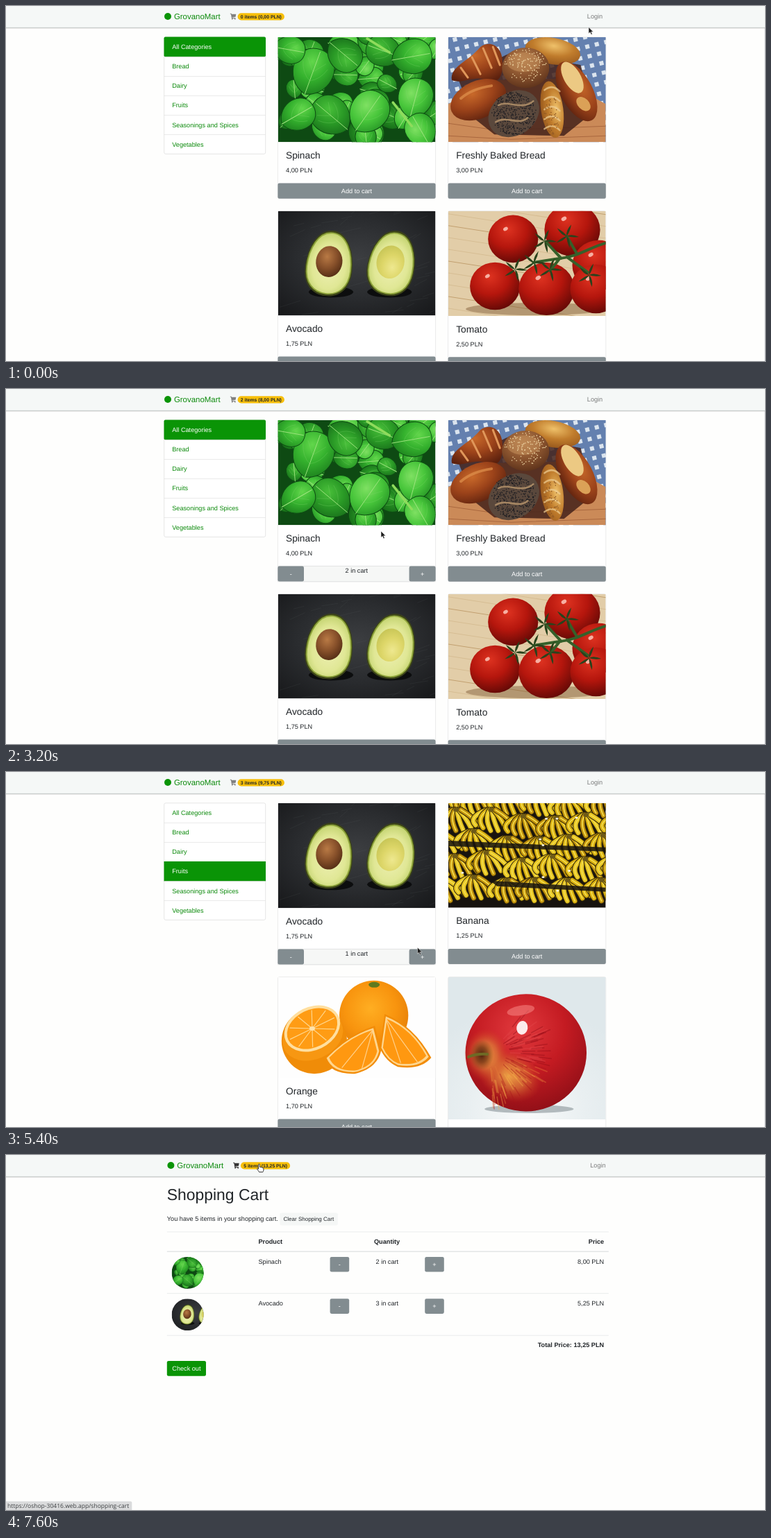
Animation, 1093 px wide and 512 px high, one loop 8 s. Source, as an HTML page:

```html
<!DOCTYPE html>
<html lang="en">
<head>
<meta charset="utf-8">
<title>Shop</title>
<style>
html, body { margin: 0; width: 100%; height: 100%; overflow: hidden; background: #fefefd; }
svg { display: block; }
text { font-family: "Liberation Sans", Arial, sans-serif; white-space: pre; text-rendering: geometricPrecision; }
#url { font-family: "Open Sans", sans-serif; }
</style>
</head>
<body>
<svg id="stage" width="1093" height="512" viewBox="0 0 1093 512"></svg>
<script>
const LOOP = 8000, STEP = 100;
const GREEN = '#0a9406', LINK = '#0c8a0c', INK = '#212529', GREY = '#828c90', DARK = '#6b777c', LINE = '#dcdcdc';
const EM = 9.16;

let seed = 7;
const rnd = (a = 0, b = 1) => {
  seed = (seed * 1103515245 + 12345) % 2147483648;
  return a + (b - a) * seed / 2147483648;
};
const pick = list => list[Math.floor(rnd() * list.length)];
const many = (n, f) => Array.from({ length: n }, (_, i) => f(i)).join('');

const text = (x, y, str, size = EM, fill = INK, more = '') =>
  `<text x="${x}" y="${y}" font-size="${size}" fill="${fill}" ${more}>${str}</text>`;
const rect = (x, y, w, h, fill, more = '') =>
  `<rect x="${x}" y="${y}" width="${w}" height="${h}" fill="${fill}" ${more}/>`;
const oval = (x, y, rx, ry, fill, turn = 0, more = '') =>
  `<ellipse rx="${rx}" ry="${ry}" fill="${fill}" transform="translate(${x} ${y}) rotate(${turn})" ${more}/>`;
const path = (d, fill, more = '') => `<path d="${d}" fill="${fill}" ${more}/>`;
const stroke = (d, color, w, more = '') =>
  path(d, 'none', `stroke="${color}" stroke-width="${w}" stroke-linecap="round" ${more}`);
const group = (x, y, inner, more = '') => `<g transform="translate(${x} ${y}) ${more}">${inner}</g>`;
const photo = (id, h, inner) => `<symbol id="${id}" viewBox="0 0 226 ${h}" preserveAspectRatio="none">${inner}</symbol>`;
const radial = (id, cx, cy, ...stops) =>
  `<radialGradient id="${id}" cx="${cx}" cy="${cy}" r=".75">` +
  stops.map((c, i) => `<stop offset="${i / (stops.length - 1)}" stop-color="${c}"/>`).join('') + '</radialGradient>';

// ---- pictures ----
function leaf(x, y, r, turn, fill) {
  const k = r * 1.15;
  return group(x, y,
    path(`M0 ${-r} C${k} ${-r} ${k} ${r * .7} 0 ${r} C${-k} ${r * .7} ${-k} ${-r} 0 ${-r}Z`, fill, 'stroke="#0d4d12" stroke-width="1"') +
    stroke(`M0 ${-r * .9} L0 ${r}`, '#9fe47f', .9) +
    stroke(`M0 ${r * .4} Q${r * .4} ${r * .2} ${r * .55} ${-r * .3} M0 ${r * .4} Q${-r * .4} ${r * .2} ${-r * .55} ${-r * .3} M0 0 L${r * .4} ${-r * .5} M0 0 L${-r * .4} ${-r * .5}`, '#7fd36c', .4, 'opacity=".7"'),
    `rotate(${turn})`);
}

function spinach() {
  const tones = ['url(#leafA)', 'url(#leafB)', 'url(#leafC)', 'url(#leafD)'];
  const big = [[50, 50, 34, 20], [76, 113, 31, -50], [130, 108, 32, 35], [28, 112, 26, 60], [152, 20, 26, -70],
    [197, 88, 29, 15], [192, 28, 29, 80], [95, 25, 27, 130], [205, 134, 25, -30], [16, 18, 23, 100]];
  return photo('spinach', 151, rect(0, 0, 226, 151, '#0e4a13') +
    many(48, () => leaf(rnd(-5, 231), rnd(-5, 156), rnd(13, 23), rnd(0, 360), pick(tones))) +
    big.map(([x, y, r, a], i) => leaf(x, y, r, a, tones[i % 3])).join('') +
    stroke('M165 94 L192 128 M128 2 L160 22', '#8fdc5c', 3.5));
}

function bread() {
  const seeds = (n, x, y, rx, ry, c) => many(n, () => {
    const a = rnd(0, 6.28), r = Math.sqrt(rnd());
    return `<circle cx="${x + rx * r * Math.cos(a)}" cy="${y + ry * r * Math.sin(a)}" r=".8" fill="${c}"/>`;
  });
  return photo('bread', 151,
    rect(0, 0, 226, 151, '#dbe4ee') +
    `<g transform="rotate(-14 113 30)" fill="#143f86" opacity=".6">` +
    many(20, i => `<path d="M${i * 14 - 20} -60h8v260h-8z M-30 ${i * 14 - 60}h290v8h-290z"/>`) + '</g>' +
    path('M0 96 L60 62 L160 60 L226 96 V151 H0Z', '#cb8a58') +
    stroke('M0 124 L70 134 L226 128 M0 142 L90 147 L226 142', '#a9673e', 1) +
    path('M14 60 L90 22 L190 40 L208 108 L166 142 L66 140 L36 116Z', '#45231a', 'opacity=".85"') +
    oval(150, 20, 40, 19, 'url(#roll)', 10) +
    path('M5 62 C2 42 28 36 46 14 C60 4 78 12 78 38 C78 62 68 68 54 62 C38 54 22 68 5 62Z', 'url(#crust)') +
    stroke('M18 44 L28 58 M34 29 L46 53 M50 16 L62 44 M64 14 L74 40', '#e0975a', 3) +
    oval(111, 44, 34, 29, 'url(#bun)') + oval(108, 36, 24, 14, '#c08b58', 0, 'opacity=".6"') + seeds(120, 111, 40, 30, 24, '#edd3a2') +
    oval(43, 90, 42, 27, 'url(#crust)', -24) + stroke('M18 88 C32 76 48 72 62 70', '#e0924e', 4, 'opacity=".7"') +
    oval(184, 78, 47, 23, 'url(#crust)', 62) + oval(178, 58, 25, 12, '#ecc983', 60) + oval(194, 96, 12, 8, '#dba157', 45) +
    oval(94, 110, 39, 31, '#5a483c', -35) + seeds(430, 94, 110, 32, 31, '#1f1e22') +
    stroke('M72 98 C85 90 105 106 122 92 M68 122 C84 112 100 128 114 116', '#a58663', 2.6) +
    oval(149, 104, 41, 16, 'url(#roll)', 82) +
    many(5, i => stroke(`M138 ${76 + i * 14} q12 -9 22 2`, '#efcf94', 2.5, 'opacity=".7"')) + seeds(50, 149, 112, 11, 28, '#8a5423'));
}

function avocado() {
  const egg = 'M0 -48 C22 -48 34 -20 34 8 C34 34 19 47 0 47 C-19 47 -34 34 -34 8 C-34 -20 -22 -48 0 -48Z';
  const half = (x, turn, core) => group(x, 76,
    path(egg, '#3d4518') + group(0, 0, path(egg, 'url(#flesh)', 'stroke="#8ea43a" stroke-width="2"'), 'scale(.93)') + core, `rotate(${turn})`);
  return photo('avocado', 151, rect(0, 0, 226, 151, 'url(#slate)') +
    many(45, () => stroke(`M${rnd(0, 226)} ${rnd(0, 151)} l${rnd(10, 30)} ${rnd(-10, -3)}`, '#6b6d70', .5, 'opacity=".25"')) +
    oval(76, 117, 32, 8, '#0c0d0e') + oval(160, 117, 32, 8, '#0c0d0e') +
    half(73.5, 7, oval(-.5, -3, 19, 22.5, 'url(#pit)')) +
    half(163, 11, oval(-2, -2, 20, 24, 'url(#hollow)')));
}

function tomato() {
  const balls = [[178, 27, 40], [93, 40, 36], [216, 78, 38], [67, 108, 36], [141, 112, 40], [212, 112, 37]];
  const star = (x, y) => group(x, y, many(5, i => `<path d="M0 0 Q5 -6 17 -5 Q8 0 0 0" fill="#29421c" transform="rotate(${i * 72 + 20})"/>`));
  return photo('tomato', 151, rect(0, 0, 226, 151, '#e2cda8') +
    many(14, i => stroke(`M0 ${i * 17 - 30} L226 ${i * 17 + 5}`, i % 3 ? '#d6bd93' : '#c2a070', 1)) +
    oval(125, 141, 100, 9, '#7a5530', 0, 'opacity=".45"') +
    balls.map(([x, y, r]) => oval(x, y, r, r * .95, 'url(#red)') + oval(x - r * .3, y - r * .4, r * .1, r * .07, '#ffd0c4', -30, 'opacity=".8"')).join('') +
    stroke('M226 46 C204 52 185 66 160 68 L122 74 M162 68 L140 44 M160 68 L146 86 M185 62 L170 36 M170 66 L200 88', '#35602a', 4) +
    star(123, 74) + star(146, 84) + star(138, 43) + star(170, 36) + star(202, 92) + star(96, 84));
}

function banana() {
  const bunch = (x, y) => group(x, y, many(6, i => {
    const dx = (i - 2.5) * 9, d = `M${dx * .3} 0 Q${dx * 1.3 - 4} 11 ${dx * 1.2 + 5} ${32 - Math.abs(i - 2.5) * 4}`;
    return stroke(d, '#3a2c08', 8.6) + stroke(d, pick(['#d9b010', '#c2930d', '#e6c522']), 6.4) + stroke(d, '#f4dc4c', 1.8);
  }) + oval(0, 0, 4, 3, '#6e5a18'));
  return photo('banana', 151, rect(0, 0, 226, 151, '#17130f') +
    many(5, r => many(6, i => bunch(i * 46 - 10 + (r % 2) * 22 + rnd(-5, 5), r * 31 - 18 + rnd(-5, 5) + i * 1.5))) +
    path('M0 54 L226 64 V70 L0 62Z M60 112 L226 122 V128 L70 120Z', '#17130f', 'opacity=".85"') +
    many(9, () => oval(rnd(0, 226), rnd(0, 140), 2, 1.4, '#f4f2e8')));
}

function orange() {
  const spokes = (n, rx, ry) => many(n, i => {
    const a = i * 6.283 / n;
    return stroke(`M0 0 L${rx * Math.cos(a)} ${ry * Math.sin(a)}`, '#ffd58a', 1.2);
  });
  const slice = (d, x, y, veins) => {
    const inner = (k, fill) => group(x, y, group(-x, -y, path(d, fill)), `scale(${k})`);
    return path(d, '#f28c08') + inner(.92, '#ffd68e') + inner(.84, '#ff9810') + stroke(veins, '#ffd08a', 1.2);
  };
  return photo('orange', 145, rect(0, 0, 226, 145, '#fefefe') +
    oval(137.5, 55, 49.5, 50, 'url(#peel)') + oval(138, 11, 8, 4, '#5f7a1e') +
    group(50, 89, oval(2, 3, 47, 47, '#f08c08') + oval(0, -4, 45, 33, '#f79712', -24) +
      oval(-1, -15, 42, 31, '#ffdf9f', -26) + oval(-1, -15, 38, 27, '#ff9c14', -26) +
      group(-1, -15, spokes(10, 35, 25), 'rotate(-26)') + oval(-1, -15, 4, 3, '#ffe3ac')) +
    slice('M66 117 Q75 140 110 139 Q142 132 148 106 L139 70 Q100 82 66 117Z', 112, 110, 'M136 76 L92 130 M136 76 L120 133') +
    slice('M146 102 L153 53 Q195 70 220 116 Q205 134 172 129 Q155 122 146 102Z', 175, 98, 'M155 60 L176 123 M155 60 L200 122'));
}

function apple() {
  return photo('apple', 205, rect(0, 0, 226, 205, 'url(#studio)') +
    oval(116, 190, 64, 6, '#98a2a6', 0, 'opacity=".7"') +
    oval(111.5, 109, 87, 84.5, 'url(#skin)') + oval(88, 142, 48, 36, 'url(#blush)', 25) +
    many(110, () => {
      const a = rnd(-.9, 1.5), r = rnd(25, 78), c = Math.cos(a), s = Math.sin(a);
      return stroke(`M${58 + r * c} ${108 + r * .85 * s} l${18 * c} ${18 * s}`, pick(a > .3 ? ['#f3ac48', '#e8803a', '#a8141a'] : ['#8f0c14', '#e0484a']), 1.6, 'opacity=".4"');
    }) +
    oval(54, 112, 32, 38, 'url(#blush)') + oval(48, 112, 17, 22, 'url(#cavity)') +
    stroke('M56 111 Q40 110 29 115', '#6e6a25', 4) +
    oval(106, 73, 8, 10, '#fff', 10, 'opacity=".9"') + oval(104, 48, 20, 7, '#ff9a94', -10, 'opacity=".45"'));
}

const gradients = [
  radial('leafA', .4, .3, '#62d74b', '#35b22e', '#1c7f1d'), radial('leafB', .6, .35, '#49c03a', '#2a9a26', '#166a19'),
  radial('leafC', .35, .4, '#7fe162', '#48c63b', '#218f22'), radial('leafD', .5, .5, '#2f9f2a', '#1c7a1c', '#0e5213'),
  radial('roll', .5, .3, '#efc16a', '#c07c2c', '#94551b'), radial('crust', .45, .3, '#c8692a', '#9c431a', '#5c210e'),
  radial('bun', .45, .3, '#b98250', '#8d5630', '#5a3019'),
  radial('flesh', .5, .55, '#eef0b4', '#e0e795', '#a3bd48'), radial('pit', .4, .35, '#b97a45', '#87502a', '#4b2711'),
  radial('hollow', .6, .65, '#eee88f', '#ddd668', '#c3c253'), radial('red', .4, .3, '#dd3220', '#b5160d', '#5e0805'),
  radial('peel', .45, .4, '#ffae22', '#f8940e', '#dd7604'), radial('skin', .45, .3, '#e23a3e', '#c41b22', '#8c0e16'),
  radial('blush', .5, .5, '#eda345', '#e08a3c99', '#d0402000', '#d0402000'), radial('cavity', .5, .5, '#4d220e', '#6e3214bb', '#80401800', '#80401800'),
  radial('slate', .5, .45, '#3c3e41', '#2a2c2f', '#161719'), radial('studio', .5, .95, '#f8fafa', '#e9eff1', '#dfe8eb')
].join('');

// ---- page pieces ----
const button = (x, y, w, h, label, fill = GREY, id = '') =>
  rect(x, y, w, h, fill, `rx="2.3" ${id && `id="${id}"`}`) + text(x + w / 2, y + h / 2 + 3.2, label, EM, '#fff', 'text-anchor="middle"');

function card(x, y, h, img, title, price, id) {
  const b = y + h;
  return rect(x, y, 227.2, h + 81.5, '#fff', `rx="2.3" stroke="${LINE}" stroke-width=".6"`) +
    `<use href="#${img}" x="${x + .4}" y="${y + .2}" width="226.6" height="${h - .2}"/>` +
    text(x + 11.6, b + 23.7, title, 13.75) + text(x + 11.6, b + 43.5, price) +
    button(x, b + 59.2, 227.2, 22.2, 'Add to cart', GREY, id);
}

const categories = ['All Categories', 'Bread', 'Dairy', 'Fruits', 'Seasonings and Spices', 'Vegetables'];
const ROW = 28.1, TOP = 44.8;
const sidebar = rect(227.7, TOP, 146, ROW * 6, '#fff', `rx="2.3" stroke="${LINE}" stroke-width=".7"`) +
  categories.map((c, i) =>
    (i ? rect(227.7, TOP + ROW * i, 146, .6, LINE) : '') +
    rect(227.5, TOP + ROW * i - .2, 146.5, ROW + .5, GREEN, `id="row${i}" rx="${i ? 0 : 2}"`) +
    text(239.2, TOP + ROW * i + 17.3, c, EM, LINK, `id="cat${i}"`)).join('');

const cartLine = (y, img, name, count, price) =>
  `<clipPath id="c-${img}"><circle cx="261.5" cy="${y + 30.2}" r="23"/></clipPath>` +
  `<g clip-path="url(#c-${img})"><use href="#${img}" x="238.5" y="${y + 7.2}" width="69" height="46"/></g>` +
  text(363.5, y + 17, name) + button(466.6, y + 7.2, 27.6, 21.7, '-') + text(532.5, y + 17, count + ' in cart') +
  button(603.2, y + 7.2, 27.6, 21.7, '+') + text(861.2, y + 17, price, EM, INK, 'text-anchor="end"');

const bold = 'font-weight="700"', end = 'text-anchor="end"';
const cartPage = text(231.8, 65.4, 'Shopping Cart', 22.92) +
  text(231.8, 95.3, 'You have 5 items in your shopping cart.') +
  rect(394.4, 83.4, 83.4, 18, '#f5f7f6', 'rx="1.8"') + text(399.5, 95.2, 'Clear Shopping Cart', 8.02) +
  [110.6, 199.4, 259.8].map(y => rect(231.8, y, 636, .7, '#e2e4e5')).join('') + rect(231.8, 138.6, 636, 1.2, '#dcdfe1') +
  text(363.5, 128, 'Product', EM, INK, bold) + text(530, 128, 'Quantity', EM, INK, bold) + text(861.2, 128, 'Price', EM, INK, `${bold} ${end}`) +
  cartLine(139.7, 'spinach', 'Spinach', 2, '8,00 PLN') + cartLine(200, 'avocado', 'Avocado', 3, '5,25 PLN') +
  text(861.2, 276.9, 'Total Price: 13,25 PLN', EM, INK, `${bold} ${end}`) +
  button(231.8, 296.9, 56.2, 21.8, 'Check out', GREEN);

const nav = rect(-10, 0, 1113, 31, '#f5f8f7') + rect(-10, 30.8, 1113, 1.5, '#c9cbcb') +
  `<circle cx="233" cy="15" r="5" fill="${GREEN}"/>` + text(241.9, 18.9, 'GrovanoMart', 11.46, LINK) +
  path('M322.8 10.8h1.8l.4 1h6.3l-.7 4-4.9.6.2.7h4.5v.8h-5.4l-1.1-6.2h-1.1z M325 18.1h1.5v1.3h-1.5z M329 18.1h1.5v1.3h-1.5z', '#808080', 'id="trolley"') +
  rect(333.6, 10.3, 68, 10.2, '#f7bf0a', 'rx="5.1" id="pill"') + text(337.8, 17.9, '', 6.87, INK, bold + ' id="badge"') +
  text(836.8, 17.9, 'Login', EM, '#7b7c7c', 'id="login"');

const stepper = rect(391.4, 255.2, 227.2, 22.7, '#f6f7f6', `stroke="${LINE}" stroke-width=".6"`) +
  text(504.8, 265.4, '', EM, INK, 'id="count" text-anchor="middle"') +
  button(391.4, 255.6, 37.6, 22, '-') + button(580.6, 255.6, 38, 22, '+', GREY, 'plus');

const arrow = path('M0 0 V9.2 L2.1 7.3 L3.7 10.8 L5.3 10.1 L3.7 6.8 H6.7Z', '#1c1c1c', 'id="arrow" stroke="#fff" stroke-width=".5"');
const hand = path('M-1 1 Q-1 0 0 0 Q1 0 1 1 V4.4 Q2.9 3.9 3.1 5 Q4.8 4.5 5 5.6 Q6.4 5.4 6.4 6.8 V9 Q6.1 10.4 5.4 11.6 H0 Q-1 9.4 -3 7.4 Q-3.2 5.9 -1 7.2Z', '#fff', 'id="hand" stroke="#222" stroke-width=".9"');

const $ = id => document.getElementById(id);
$('stage').innerHTML = `<defs>${gradients}${spinach()}${bread()}${avocado()}${tomato()}${banana()}${orange()}${apple()}</defs>` +
  rect(0, 0, 1093, 512, '#fefefd') +
  `<g id="shop">${sidebar}
    <g id="all">${card(391.4, 44.8, 151.5, 'spinach', 'Spinach', '4,00 PLN', 'add0')}
      ${card(636.6, 44.8, 151.5, 'bread', 'Freshly Baked Bread', '3,00 PLN', 'add1')}
      ${card(391.4, 295.6, 150.8, 'avocado', 'Avocado', '1,75 PLN')}
      ${card(636.6, 295.6, 151.5, 'tomato', 'Tomato', '2,50 PLN')}</g>
    <g id="fruits">${card(391.4, 44.8, 151.5, 'avocado', 'Avocado', '1,75 PLN', 'add2')}
      ${card(636.6, 44.8, 150.9, 'banana', 'Banana', '1,25 PLN')}
      ${card(391.4, 295.6, 145.6, 'orange', 'Orange', '1,70 PLN')}
      ${card(636.6, 295.6, 205.4, 'apple', 'Apple', '1,50 PLN')}</g>
    <g id="stepper">${stepper}</g>${rect(1092, 0, 1, 512, '#e6e7ea')}</g>
  <g id="cart">${cartPage}</g><g id="nav">${nav}</g>
  <g id="status">${rect(-3, 499.6, 190, 16, '#dadbdc', 'rx="2" id="box"')}${text(2, 509.3, '', 8.52, '#3c3f41', 'id="url"')}</g>
  <g id="mouse">${arrow}${hand}</g>`;

// ---- timeline ----
const track = [
  [0, 839, 30.5], [100, 837, 31], [400, 837, 31], [500, 855, 15], [600, 846, 24], [700, 815, 70], [900, 710, 165],
  [1100, 615, 225], [1300, 565, 250], [1500, 556, 263], [1600, 556, 263], [1900, 604, 264], [2300, 604, 264],
  [2500, 615, 274], [2700, 655, 262], [3000, 628, 256], [3100, 628, 256], [3200, 540, 205], [3400, 262, 114],
  [3700, 262, 114], [3800, 266, 136], [4000, 265.5, 134.5], [4300, 265.5, 134.5], [4500, 340, 198], [4700, 472, 213.5],
  [4800, 472, 213.5], [5100, 512, 264], [5200, 514, 264], [5400, 592.5, 253], [5700, 600, 265], [6300, 600, 265],
  [6500, 540, 215], [6700, 368, 85], [6800, 362, 40], [6900, 368, 11], [7400, 367.5, 10.5], [7500, 376, 12], [7600, 364.5, 13], [8000, 364.5, 13]
];
const orders = [
  [0, 0, '0 items (0,00 PLN)'], [1600, 1, '1 item (4,00 PLN)'], [2300, 2, '2 items (8,00 PLN)'], [4300, 0, '2 items (8,00 PLN)'],
  [5200, 1, '3 items (9,75 PLN)'], [6000, 2, '4 items (11,50 PLN)'], [6200, 3, '5 items (13,25 PLN)']
];
const links = [[0, ''], [3600, '?category=dairy'], [3800, '?category=fruits'], [4500, '?category=vegetables'], [4900, ''], [7100, 'shopping-cart']];
const latest = (list, t) => list.filter(e => e[0] <= t).pop();

function pointer(t) {
  const i = Math.max(1, track.findIndex(k => k[0] >= t));
  const [t0, x0, y0] = track[i - 1], [t1, x1, y1] = track[i];
  const k = (t - t0) / (t1 - t0);
  return [x0 + (x1 - x0) * k, y0 + (y1 - y0) * k];
}

const set = (id, name, value) => $(id).setAttribute(name, value);
const show = (id, on) => set(id, 'visibility', on ? 'inherit' : 'hidden');

function draw(t) {
  const page = t < 4300 ? 'all' : t < 7200 ? 'fruits' : 'cart';
  const shop = page !== 'cart';
  const [x, y] = pointer(t);
  const over = (a, b, c, d) => x >= a && x <= b && y >= c && y <= d;

  show('shop', shop);
  for (const id of ['all', 'fruits', 'cart']) show(id, page === id);
  set('nav', 'transform', `translate(${shop ? 0 : 4.4} 0)`);

  const inList = shop && over(228, 374, TOP, TOP + ROW * 6);
  const hot = inList ? Math.floor((y - TOP) / ROW) : -1;
  const active = page === 'all' ? 0 : 3;
  categories.forEach((_, i) => {
    show('row' + i, shop && i === active);
    set('cat' + i, 'fill', i === active ? '#fff' : i === hot ? '#3fce45' : LINK);
  });

  const [, count, badge] = latest(orders, t);
  $('badge').textContent = badge;
  set('pill', 'width', $('badge').getComputedTextLength() + 8.2);
  show('stepper', shop && count > 0);
  $('count').textContent = count + ' in cart';
  const onFirst = over(391, 618.6, 255.5, 277.6);
  set('add0', 'fill', onFirst ? DARK : GREY);
  set('add2', 'fill', onFirst ? DARK : GREY);
  set('add1', 'fill', over(636.6, 864, 255.5, 277.6) ? DARK : GREY);
  set('plus', 'fill', onFirst && x > 580 ? DARK : GREY);
  set('plus', 'stroke', t >= 6000 ? '#6f7a7f' : 'none');
  set('plus', 'stroke-opacity', .7);

  const onLogin = over(833, 863, 2, 29), onCart = over(319, 410, 2, 29);
  set('login', 'fill', onLogin ? '#444' : '#7b7c7c');
  set('trolley', 'fill', onCart ? '#333' : '#808080');

  const link = latest(links, t)[1];
  show('status', link !== '');
  $('url').textContent = 'https://oshop-30416.web.app/' + link;
  set('box', 'width', $('url').getComputedTextLength() + 9);
  set('status', 'opacity', t === 7100 ? .45 : 1);

  const pointing = inList || onLogin || onCart;
  set('mouse', 'transform', `translate(${x} ${y})`);
  show('hand', pointing);
  show('arrow', !pointing);
}

const start = performance.now();
function tick() {
  const t = (performance.now() - start) % LOOP;
  draw(Math.floor(t / STEP) * STEP);
  requestAnimationFrame(tick);
}
tick();
</script>
</body>
</html>
```
